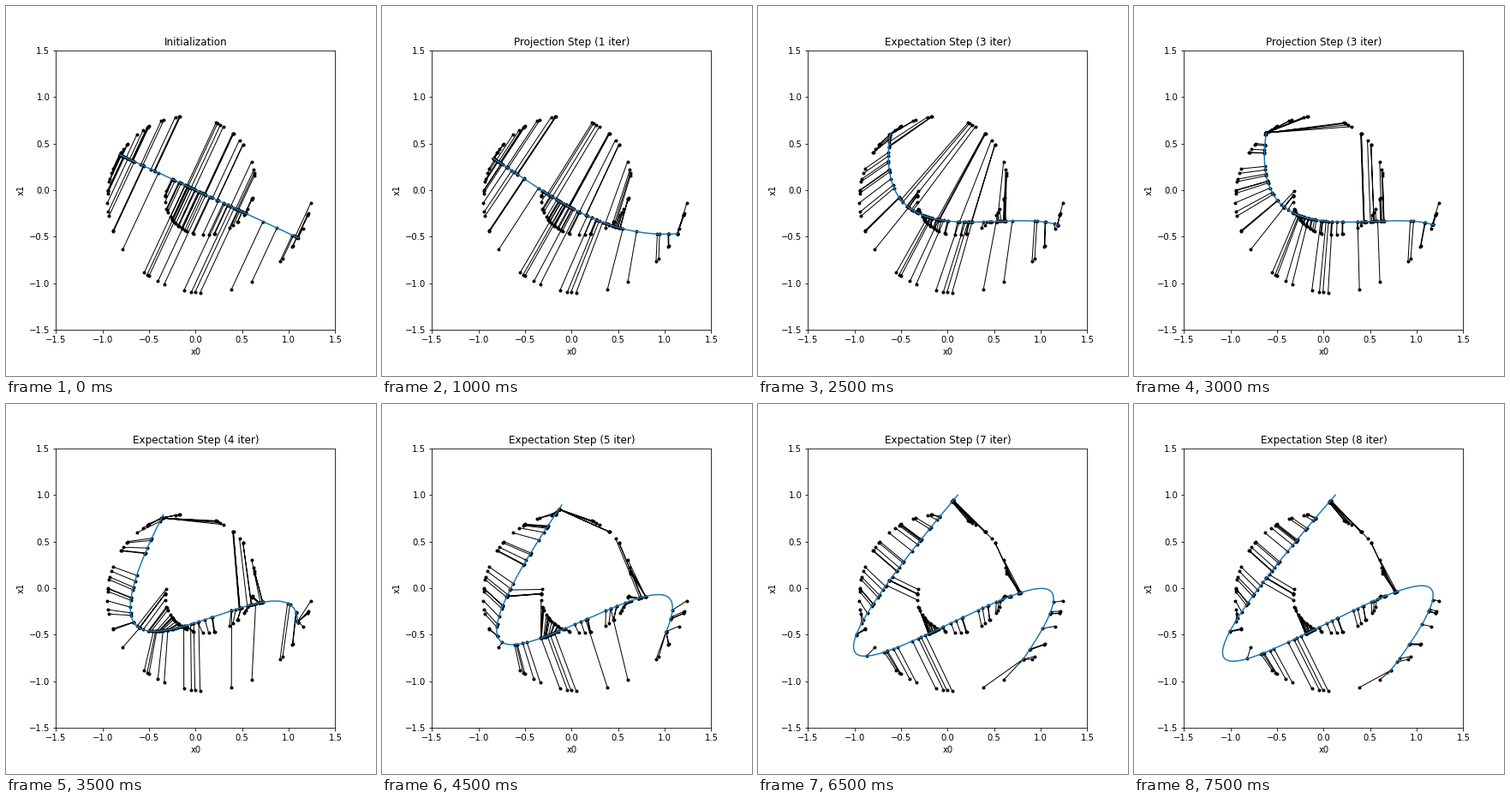
Animation, 432 px wide and 432 px high, one loop 8 s. Source, as a matplotlib script:

```python
import numpy as np
import matplotlib.pyplot as plt
from matplotlib.animation import FuncAnimation

# Noise-free spiral r = theta / 10
rng = np.random.RandomState(0)
theta = np.pi + 3 * np.pi * rng.rand(100)
X = 0.1 * theta[:, None] * np.column_stack([np.cos(theta), np.sin(theta)])


def fit(lam):
    """Cubic least-squares curve through the data, as a function of lam."""
    coef = np.polyfit(lam, X, 3)
    return lambda t: np.vander(t, 4) @ coef


def grid(lam, margin=0.01):
    return np.linspace(lam.min() - margin, lam.max() + margin, 2000)


def project(curve, t):
    """Parameter of the nearest curve point for each data point."""
    d = ((X[:, None] - curve(t)[None]) ** 2).sum(-1)
    return t[d.argmin(1)]


def run(iters):
    """Yield (title, curve points, feet) for every step."""
    axis = np.linalg.svd(X, full_matrices=False)[2][0]
    lam = X @ axis
    yield "Initialization", np.outer(grid(lam, 0), axis), np.outer(lam, axis)
    for k in range(1, iters + 1):
        curve, t = fit(lam), grid(lam)
        yield f"Expectation Step ({k} iter)", curve(t), curve(lam)
        lam = project(curve, t)
        yield f"Projection Step ({k} iter)", curve(t), curve(lam)


steps = list(run(8))[:16]

fig, ax = plt.subplots(figsize=(6, 6), dpi=72, facecolor="white")
fig.subplots_adjust(left=0.125, right=0.9, bottom=0.125, top=0.88)
ax.set_aspect("equal")
ax.set(xlim=(-1.5, 1.5), ylim=(-1.5, 1.5), xlabel="x0", ylabel="x1")
ticks = np.arange(-1.5, 1.6, 0.5)
ax.set_xticks(ticks)
ax.set_yticks(ticks)
title = ax.set_title("")
links, = ax.plot([], [], "k.-", lw=1)
path, = ax.plot([], [], color="#1f77b4", lw=1.5)


def draw(i):
    name, curve, feet = steps[i]
    title.set_text(name)
    gap = np.full_like(X, np.nan)
    links.set_data(*np.stack([X, feet, gap], axis=1).reshape(-1, 2).T)
    path.set_data(*curve.T)
    return title, links, path


anim = FuncAnimation(fig, draw, frames=len(steps), interval=500,
                     repeat=True, repeat_delay=0, blit=False)
plt.show()
```
